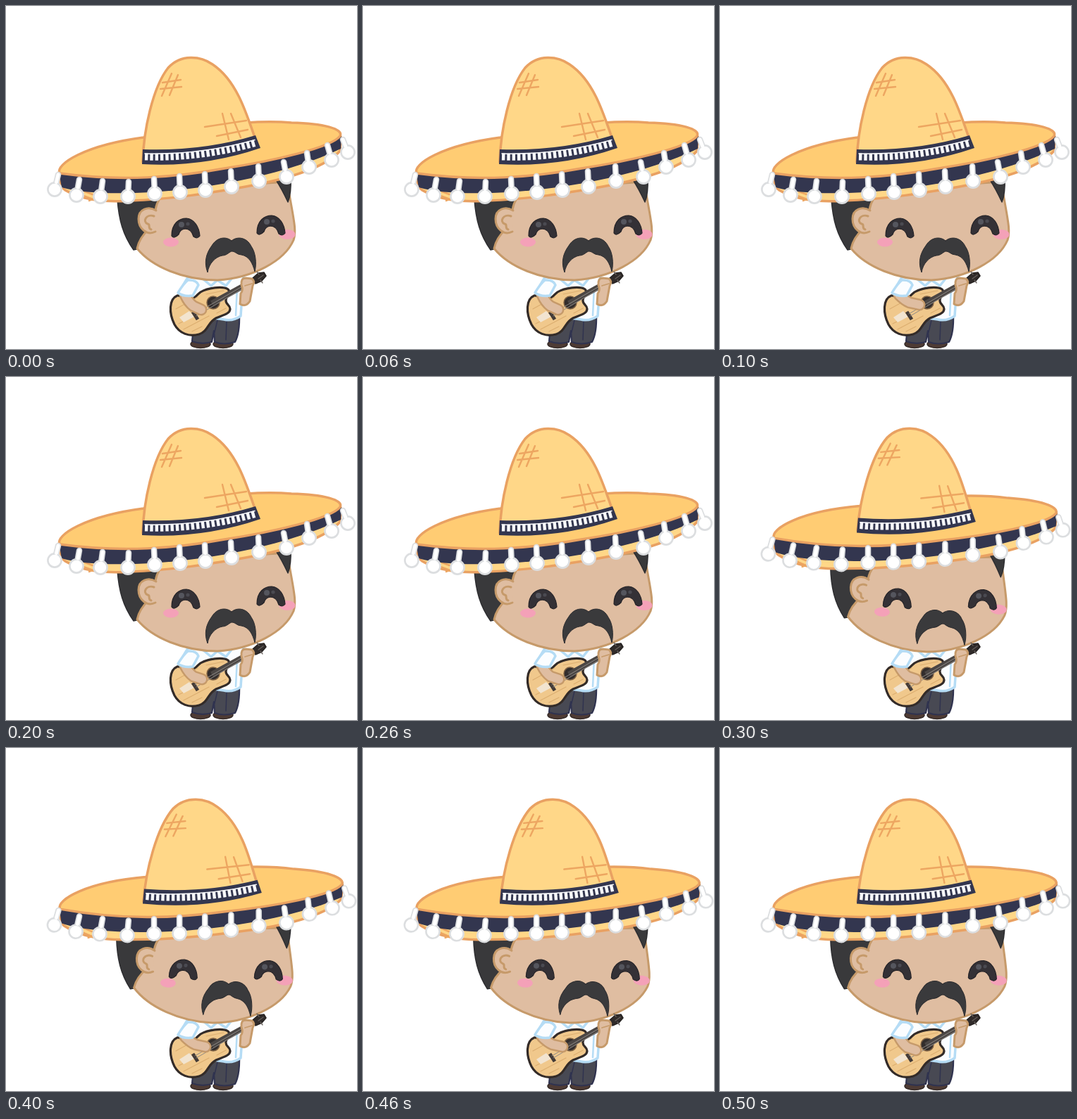
Recreate the animation shown at these times as an HTML page. Size 498 by 488 pixels, loop 600 ms.

```html
<!DOCTYPE html>
<html lang="en">
<head>
<meta charset="utf-8">
<title>Guitar player</title>
<style>
  html, body { margin: 0; width: 100%; height: 100%; overflow: hidden; background: #fff; }
  svg { display: block; width: 100vw; height: 100vh; }
  path { stroke-linecap: round; stroke-linejoin: round; }
  .flat { stroke-linecap: butt; }
  .line { fill: none; }
  .skin { fill: #dfbda1; stroke: #c69a6a; stroke-width: 3; }
  .straw { fill: #ffcc73; stroke: #e9a162; stroke-width: 3.5; }
  .pale { fill: #ffd788; }
  .scratch { fill: none; stroke: #eda661; stroke-width: 2.4; }
  .hair { fill: #39393b; stroke: #2e2e31; stroke-width: 1.5; }
  .navy { fill: #33364f; }
  .shirt { fill: #fbfdff; stroke: #b5dcf5; stroke-width: 3.5; }
  .pom { fill: #fff; stroke: #dcdee0; stroke-width: 2.6; }
  .cheek { fill: #f4a1b8; }
  .pants { fill: #484953; stroke: #30334f; stroke-width: 2.2; }
  .shoe { fill: #4e3b34; stroke: #332926; stroke-width: 1.5; }
</style>
</head>
<body>
<svg viewBox="0 0 498 488" preserveAspectRatio="none">
  <defs>
    <path id="eye" d="M-20 13C-20-5-9-12 1-12C12-11 19 0 20 13Q17 18 11 14Q8 3-1 3Q-8 4-10 11Q-17 18-20 13Z"/>
    <g id="eyeFull">
      <use href="#eye" fill="#343136" stroke="#252327" stroke-width="1.2"/>
      <circle cx="-6" cy="-3" r="4" fill="#55565e"/>
      <circle cx="3" cy="-4" r="2.6" fill="#4a4a51"/>
    </g>
  </defs>

  <g id="body">
    <ellipse class="shoe" cx="276" cy="481" rx="14" ry="5.5"/>
    <ellipse class="shoe" cx="308" cy="481" rx="14" ry="5.5"/>
    <path class="pants" d="M268 436L331 438Q332 465 325 478Q309 483 296 478L295 462L292 478Q277 482 264 477Z"/>
    <path class="line" d="M296 464L300 447M312 475L313 448" stroke="#30334f" stroke-width="1.5"/>
    <path class="shirt" d="M258 386L337 384L333 441Q322 449 309 446L266 440L267 414Q253 414 246 406Z"/>
    <path class="shirt" d="M279 388L291 398L300 390L312 398L320 388" stroke-width="2"/>
    <path class="line" d="M328 400L326 440M268 401L264 412" stroke="#b5dcf5" stroke-width="2.5"/>
  </g>

  <g id="head">
    <path class="hair" d="M158 275C160 304 166 326 181 347L190 345L204 318L190 296L213 292L232 264Z"/>
    <path class="skin" d="M230 262Q215 272 212 290L203 317Q189 330 186 345C207 371 252 390 300 390C350 387 395 363 408 333C413 318 407 300 399 250Z"/>
    <path class="skin" d="M213 291C202 284 188 289 188 303C188 317 200 327 212 321"/>
    <path class="line" d="M210 299C199 295 193 307 201 310C206 311 200 316 206 318" stroke="#c69a6a" stroke-width="3"/>
    <path class="hair" d="M382 246C390 258 395 268 400 279Q405 267 404 244Z"/>
    <ellipse class="cheek" cx="234" cy="336" rx="11" ry="6.5"/>
    <ellipse class="cheek" cx="399" cy="325" rx="11.5" ry="7"/>
    <use href="#eyeFull" x="255" y="314"/>
    <use href="#eyeFull" x="376" y="310"/>
    <path fill="#3a3a3c" stroke="#2c2c2f" d="M320 334C312 327 299 329 292 341C283 353 281 366 286 379C288 366 297 357 307 355C314 355 317 349 321 349C325 349 328 354 334 354C345 356 350 366 353 378C356 366 354 350 348 342C342 329 328 327 320 334Z"/>

    <path class="straw pale" d="M76 240Q77 258 84 262C105 275 140 280 175 277C235 275 290 266 340 257C395 247 452 231 474 206L475 186Z"/>
    <path class="scratch" d="M100 266L124 275M112 264L139 274M118 277L142 268"/>
    <path class="navy" d="M75 236L79 258C112 268 165 267 205 265C295 260 405 237 475 203L476 182Z"/>
    <path class="straw" d="M76 238C70 225 112 198 195 187C270 172 350 161 405 166C451 167 479 175 474 185C462 201 382 220 310 231C240 244 165 250 76 238Z"/>
    <path class="straw pale" d="M194 222C195 178 208 116 230 88C248 68 276 71 293 83C326 105 340 148 356 196Q275 230 194 222Z"/>
    <path class="scratch" d="M235 96L221 128M244 98L232 127M222 109L248 105M219 118L249 115M307 153L316 190M319 153L333 187M282 172L341 163M299 185L343 176"/>
    <path class="navy" d="M194 204Q278 207 354 184L361 202Q280 230 193 225Z"/>
    <path class="line flat" d="M197 214.500Q277 217 355 194.500" stroke="#f7f8fa" stroke-width="10" stroke-dasharray="4.400 2.900"/>
    <path class="line" d="M197 210Q277 212 353 190.500" stroke="#f7f8fa" stroke-width="1.500"/>
    <g id="poms"></g>
  </g>

  <g id="guitar">
    <path fill="#f0c88c" stroke="#332b28" stroke-width="3.2" d="M243 412C231 417 231 437 239 453C246 466 260 471 274 467C287 463 286 450 298 444C307 440 318 438 318 431C318 425 311 425 312 418C313 411 320 408 315 403C307 398 286 401 276 407C267 414 265 421 257 419C250 417 250 411 243 412Z"/>
    <path class="line" stroke="#dcae70" stroke-width="1.2" d="M241 431L272 414M245 452L257 446M252 460L288 441M264 463L278 456M284 410L309 405M299 437L312 430"/>
    <path fill="#f2e4d0" d="M246 443L260 434L267 442L252 450Z"/>
    <path class="flat" stroke="#423a37" stroke-width="5" d="M265 435L272 446"/>
    <circle cx="294" cy="422" r="9" fill="#322d2c" stroke="#7f6244" stroke-width="1.5"/>
    <path class="flat" stroke="#4b4644" stroke-width="8" d="M292 423L354 389"/>
    <path stroke="#8d8985" stroke-width="1" d="M268 438L354 388M270 441L355 391"/>
    <path fill="#302b2a" stroke="#262221" stroke-width="1.5" d="M350 387L358 380L366 379L369 384L363 391L354 395Z"/>
    <path stroke="#66605c" stroke-width="1.3" d="M356 378L359 382M364 394L361 390M358 388L365 383"/>
    <path class="skin" d="M334 397Q333 387 340 387L349 388Q354 392 350 398L346 420Q340 429 332 424L333 409Q337 405 334 397Z"/>
    <path class="line" d="M339 398L349 395" stroke="#c69a6a" stroke-width="1.8"/>
  </g>

  <g id="strum"></g>
  <path class="shirt" d="M258 390C251 396 247 403 244 408Q252 414 265 412L273 397Q270 389 258 390Z"/>
</svg>

<script>
const NS = "http://www.w3.org/2000/svg";
const byId = id => document.getElementById(id);
const add = (parent, tag, attrs) => {
  const el = document.createElementNS(NS, tag);
  for (const k in attrs) el.setAttribute(k, attrs[k]);
  return parent.appendChild(el);
};

// Ball x, ball y, stem top x, stem top y
const poms = [
  [69, 261, 74, 240], [100, 269, 104, 247], [134, 271, 137, 249], [173, 271, 174, 250],
  [211, 267, 210, 246], [247, 265, 246, 242], [283, 262, 282, 239], [320, 257, 319, 235],
  [359, 249, 358, 228], [398, 243, 394, 222], [430, 229, 427, 209], [462, 219, 456, 198],
  [485, 208, 478, 190]
];
for (const [x, y, tx, ty] of poms) {
  const g = byId("poms");
  add(g, "path", { d: `M${tx} ${ty}L${x} ${y}`, stroke: "#dcdee0", "stroke-width": 8.5 });
  add(g, "circle", { class: "pom", cx: x, cy: y, r: 9.6 });
  add(g, "path", { d: `M${tx} ${ty}L${(x + tx) / 2} ${(y + ty) / 2}`, stroke: "#fff", "stroke-width": 5 });
}

const arms = {
  low: "M254 411Q259 422 266 427L277 432",
  mid: "M254 411Q259 421 266 426L278 430",
  high: "M254 411Q262 419 269 422L283 425"
};
const strokes = [["#c69a6a", 17], ["#dfbda1", 12]].map(([stroke, w]) =>
  add(byId("strum"), "path", { class: "line", stroke, "stroke-width": w }));

const upright = "";
const tilted = "translate(2 1) rotate(2.6 293 200)";
const steps = [
  [upright, "low"], [upright, "high"], [upright, "mid"],
  [tilted, "mid"], [tilted, "high"], [tilted, "mid"]
];
const STEP = 100;
const start = performance.now();

function draw(now) {
  const t = Math.max(0, now - start);
  const [pose, arm] = steps[Math.floor(t / STEP) % steps.length];
  byId("head").setAttribute("transform", pose);
  strokes.forEach(p => p.setAttribute("d", arms[arm]));
  requestAnimationFrame(draw);
}
draw(start);
</script>
</body>
</html>
```
